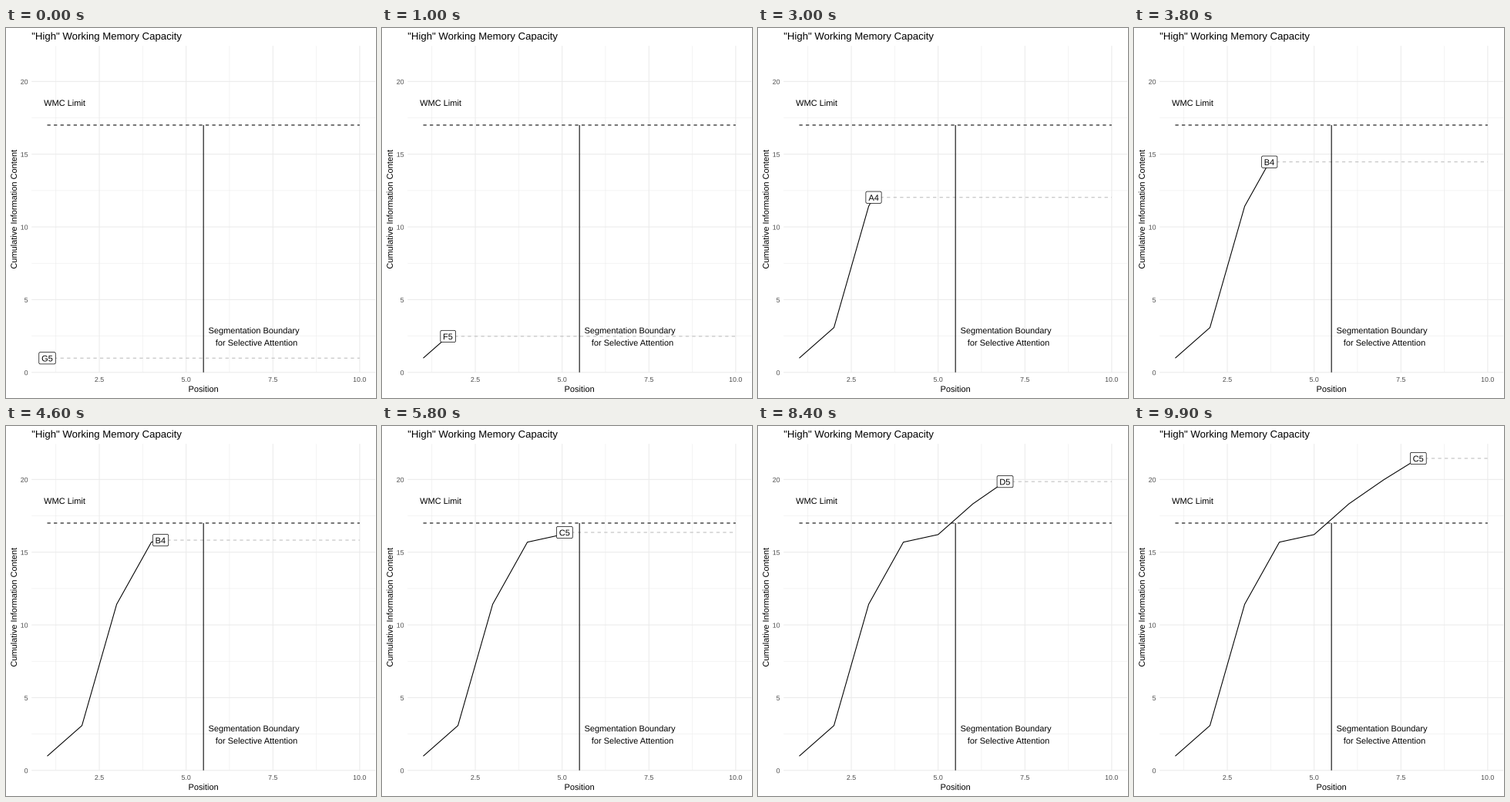
Write a matplotlib script that moves like this. It is 480 px wide and 480 px high and loops after 10 s.

```python
import numpy as np
import matplotlib as mpl
import matplotlib.pyplot as plt
from matplotlib.animation import FuncAnimation
from matplotlib.patches import FancyBboxPatch, PathPatch
from matplotlib.textpath import TextPath
from matplotlib.transforms import Affine2D

mpl.rcParams["font.family"] = "Liberation Sans"

SIZE, DPI = 480, 100
FRAMES, INTERVAL = 100, 100
PT = 72 / DPI  # points per pixel

NOTES = ["G5", "F5", "A4", "B4", "C5", "E5", "D5", "C5"]
CONTENT = np.array([0.98, 3.08, 11.42, 15.69, 16.21, 18.32, 19.97, 21.45])
POSITION = np.arange(1, 9)
KEYS = np.round((FRAMES - 1) * (POSITION - 1) / 7)  # frame at which each note is reached
EM = {"A": .667, "B": .667, "C": .722, "D": .722, "E": .667, "F": .611, "G": .778}

LEFT, RIGHT, TOP, BOTTOM = 33.2, 479.1, 23.2, 446.75
LABEL_SIZE, LABEL_H = 11, 15.3


def px(pos):
    return 458.85 - 45.04 * (10 - pos)


def py(val):
    return BOTTOM - 18.87 * val


fig = plt.figure(figsize=(SIZE / DPI, SIZE / DPI), dpi=DPI, facecolor="white")
ax = fig.add_axes([0, 0, 1, 1])
ax.set_xlim(0, SIZE)
ax.set_ylim(SIZE, 0)
ax.axis("off")


def line(xs, ys, color="black", width=1.07, z=2, **kw):
    return ax.plot(xs, ys, color=color, lw=width * PT, zorder=z, snap=False,
                   solid_capstyle="butt", **kw)[0]


def glyphs(x, y, s, size=11, ha="center", angle=0):
    """Outline of a text with its baseline at y, placed at subpixel precision."""
    path = TextPath((0, 0), s, size=size)
    ext = path.get_extents()
    shift = {"left": 0, "center": -(ext.x0 + ext.x1) / 2, "right": -ext.x1}[ha]
    place = Affine2D().translate(shift, 0).rotate_deg(angle).scale(1, -1).translate(x, y)
    return place.transform_path(path)


def text(x, y, s, size=11, color="black", z=6, **kw):
    patch = PathPatch(glyphs(x, y, s, size, **kw), fc=color, lw=0, zorder=z, snap=False)
    return ax.add_patch(patch)


def grid(xs, ys, width):
    for x in xs:
        line([px(x)] * 2, [TOP, BOTTOM], "#EBEBEB", width, z=1)
    for y in ys:
        line([LEFT, RIGHT], [py(y)] * 2, "#EBEBEB", width, z=1)


x_ticks, y_ticks = np.arange(2.5, 11, 2.5), np.arange(0, 21, 5)
grid(x_ticks - 1.25, y_ticks[:4] + 2.5, 0.53)
grid(x_ticks, y_ticks, 1.07)
for t in x_ticks:
    text(px(t), 459, f"{t:.1f}", 8.8, color="#4D4D4D")
for t in y_ticks:
    text(28.2, py(t) + 3.5, str(t), 8.8, ha="right", color="#4D4D4D")

text(33.2, 15, '"High" Working Memory Capacity', 13.2, ha="left")
text(256.2, 472.1, "Position")
text(13.9, 235, "Cumulative Information Content", angle=90)

# Annotations lie above the moving label
DASH = (0, (4, 4))
line([px(1), px(10)], [py(17)] * 2, z=5, linestyle=DASH)
line([px(5.5)] * 2, [py(17), BOTTOM], z=5)
text(px(1.5), 101, "WMC Limit")
text(321.8, 396.2, "Segmentation Boundary")
text(324.7, 412.1, "for Selective Attention")

curve = line([], [], solid_joinstyle="round")
guide = line([], [], "#BEBEBE", z=3, linestyle=DASH)
box = FancyBboxPatch((0, 0), 20, LABEL_H, boxstyle="round,pad=0,rounding_size=1.8",
                     fc="white", ec="black", lw=0.71 * PT, zorder=4)
ax.add_patch(box)
label = text(0, 0, NOTES[0], LABEL_SIZE, z=4.5)


def update(k):
    pos = np.interp(k, KEYS, POSITION)
    val = np.interp(pos, POSITION, CONTENT)
    x, y = px(pos), py(val)
    done = POSITION < pos

    curve.set_data(np.append(px(POSITION[done]), x), np.append(py(CONTENT[done]), y))
    guide.set_data([x, px(10)], [y, y])

    note = NOTES[int(pos + 0.5 + 1e-9) - 1]
    w = LABEL_SIZE * (EM[note[0]] + 0.556) + 6.8
    box.set_bounds(x - w / 2, y - LABEL_H / 2, w, LABEL_H)
    label.set_path(glyphs(x, y + 4.2, note, LABEL_SIZE))
    return curve, guide, box, label


anim = FuncAnimation(fig, update, frames=FRAMES, interval=INTERVAL,
                     repeat=True, repeat_delay=0, blit=False)
plt.show()
```
